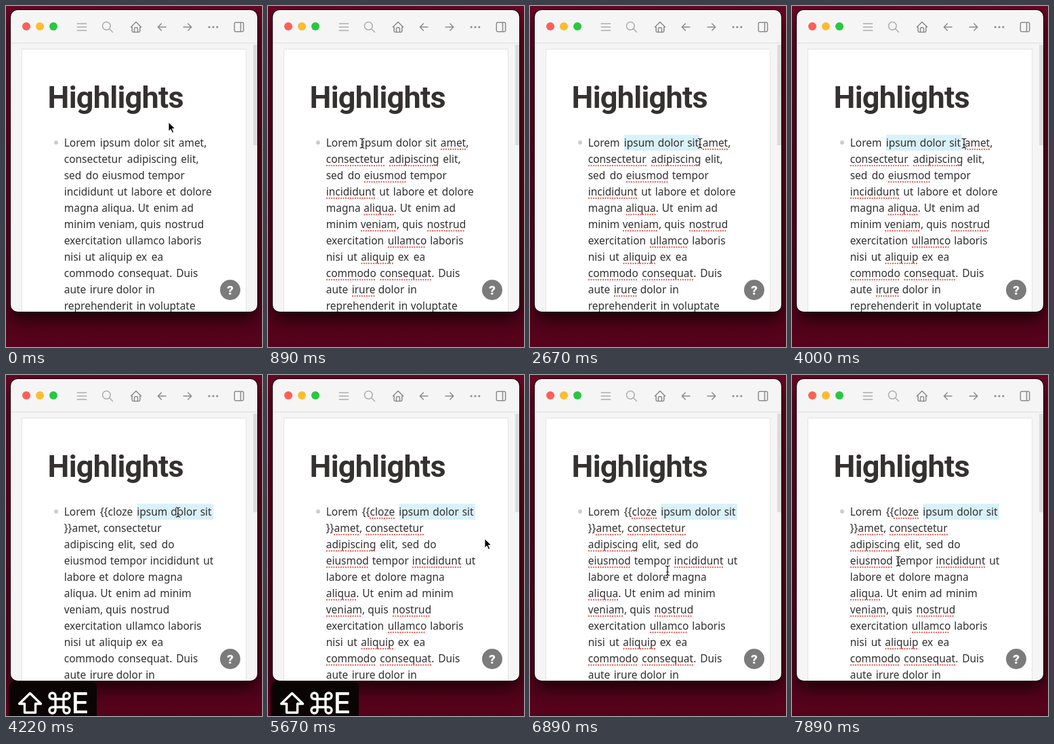
These frames come from a looping animation (378x502 px, 8000 ms). An HTML page:

```html
<!DOCTYPE html>
<html lang="en">
<head>
<meta charset="utf-8">
<title>Highlights</title>
<style>
  html, body { margin: 0; width: 100%; height: 100%; overflow: hidden; background: #55031c; }
  svg { display: block; width: 100%; height: 100%; }
  .body { font: 15.5px "Noto Sans", "Open Sans", sans-serif; fill: #303030; }
  .title { font: 700 45px Roboto, sans-serif; letter-spacing: -.75px; fill: #353131; }
  .squiggle { stroke: #e8625c; stroke-width: 2.3; stroke-linecap: round; stroke-dasharray: 0 3.5; }
  .icon { fill: none; stroke: #8c8c8c; stroke-width: 1.85; stroke-linecap: round; stroke-linejoin: round; }
  .pale { stroke: #adadad; }
  .key { fill: none; stroke: #fff; stroke-width: 3.4; stroke-linejoin: round; }
</style>
</head>
<body>
<svg viewBox="0 0 378 502">
  <defs>
    <linearGradient id="wall" x2="0" y2="1">
      <stop offset="0" stop-color="#6a0624"/>
      <stop offset=".5" stop-color="#62041f"/>
      <stop offset="1" stop-color="#55031b"/>
    </linearGradient>
    <filter id="blur" x="-20%" y="-20%" width="140%" height="140%"><feGaussianBlur stdDeviation="13"/></filter>
    <clipPath id="frame"><rect x="7" y="6" width="364" height="444" rx="10"/></clipPath>
  </defs>

  <rect width="378" height="502" fill="url(#wall)"/>
  <rect x="7" y="18" width="364" height="444" rx="10" opacity=".7" filter="url(#blur)"/>
  <rect x="6" y="5" width="366" height="446" rx="11" fill="#16000a"/>

  <g clip-path="url(#frame)">
    <rect x="7" y="6" width="364" height="444" fill="#f5f5f5"/>
    <rect x="7" y="54" width="364" height="1" fill="#dedede"/>
    <rect x="23.5" y="63.5" width="331" height="400" fill="#fff" stroke="#e4e4e4"/>
    <rect id="thumb" x="365" y="57" width="6" fill="#dcdcdc"/>

    <circle cx="30" cy="30" r="6" fill="#fe5f57"/>
    <circle cx="50" cy="30" r="6" fill="#febc2e"/>
    <circle cx="70" cy="30" r="6" fill="#28c840"/>
    <g id="toolbar"></g>

    <text class="title" x="61.6" y="149.5">Highlights</text>
    <circle cx="74" cy="201" r="3" fill="#cdcdcd"/>
    <rect id="mark" y="189.5" height="23.5" fill="#d9f1f9"/>
    <g id="before"></g>
    <g id="after"></g>

    <circle cx="331" cy="418" r="15" fill="#7b7b7b"/>
    <text x="331" y="424.5" text-anchor="middle" fill="#fff" style="font:900 19px Roboto,sans-serif">?</text>
  </g>

  <g id="keys">
    <rect x="4" y="450" width="130" height="64" rx="11" fill="#0b0405"/>
    <path class="key" d="M35.5 468.5L51.5 484H43.5V497H27.5V484H19.5Z"/>
    <path class="key" d="M73 472.5a4.500 4.500 0 1 0-4.500 4.500h21a4.500 4.500 0 1 0-4.500-4.500v21a4.500 4.500 0 1 0 4.500-4.500h-21a4.500 4.500 0 1 0 4.500 4.500z"/>
    <text x="96.5" y="498" fill="#fff" style="font:500 43px Inter,sans-serif">E</text>
  </g>

  <path id="arrow" d="M0 0V13.5L3.2 10.6L5.4 15.7L7.7 14.7L5.5 9.7H9.8Z" fill="#000" stroke="#fff"/>
  <g id="beam" fill="none" stroke-linecap="round">
    <path d="M-3-7Q0-7 0-5Q0-7 3-7M0-5V5M-3 7Q0 7 0 5Q0 7 3 7M-1.500 2H1.500" stroke="#fff" stroke-width="2.6"/>
    <path d="M-3-7Q0-7 0-5Q0-7 3-7M0-5V5M-3 7Q0 7 0 5Q0 7 3 7M-1.500 2H1.500" stroke="#111" stroke-width="1.2"/>
  </g>
</svg>

<script>
const $ = id => document.getElementById(id);
const LOOP = 8000, FPS = 9;
const LEFT = 86, RIGHT = 307, TOP = 207, LEADING = 24, ROWS = 11, SPACE = 6;

// Toolbar icons on a 24 unit grid, shown at 20 pixels around a centre x
const icon = (x, d, tone = "") =>
  `<path class="icon ${tone}" transform="translate(${x - 10} 21) scale(${20 / 24})" d="${d}"/>`;
$("toolbar").innerHTML =
  icon(112, "M4 6h16M4 12h16M4 18h16", "pale") +
  icon(150, "M17 10a7 7 0 1 0-14 0a7 7 0 1 0 14 0M21 21l-6-6", "pale") +
  icon(192, "M5 12H3l9-9l9 9h-2M5 12v7a2 2 0 0 0 2 2h10a2 2 0 0 0 2-2v-7M9 21v-6a2 2 0 0 1 2-2h2a2 2 0 0 1 2 2v6") +
  icon(230.2, "M5 12h14M5 12l6 6M5 12l6-6") +
  icon(268, "M5 12h14M13 18l6-6M13 6l6 6") +
  icon(306, [5, 12, 19].map(x => `M${x - 1} 12a1 1 0 1 0 2 0a1 1 0 1 0-2 0`).join("")) +
  icon(344, "M6 4h12a2 2 0 0 1 2 2v12a2 2 0 0 1-2 2H6a2 2 0 0 1-2-2V6a2 2 0 0 1 2-2zM15 4v16");

// word:advance, with * on words the spell checker flags
const tail = `consectetur:93* adipiscing:79.5* elit,:32.5 sed:32 do:24 eiusmod:68* tempor:59
  incididunt:78.5* ut:20.5 labore:51.5 et:20.5 dolore:52 magna:55.5 aliqua.:53.5* Ut:23 enim:41
  ad:24 minim:51 veniam,:61.5* quis:36.5 nostrud:62* exercitation:91 ullamco:62.5* laboris:55
  nisi:31 ut:20.5 aliquip:54.5* ex:23 ea:22 commodo:79.5* consequat.:86* Duis:38 aute:38
  irure:39* dolor:43.5 in:18 reprehenderit:107 in:18 voluptate:74`;
const plain = "Lorem:53 ipsum:50 dolor:43.5 sit:22.5 amet,:47* " + tail;
const cloze = "Lorem:53 {{cloze:54.5* ipsum:50 dolor:43.5 sit:22.5 }}amet,:58* " + tail;

// Wraps the words and returns markup for the text and the spelling dots.
function paragraph(source) {
  let x = LEFT, row = 0, words = "", dots = "";
  for (const item of source.split(/\s+/)) {
    const [word, size] = item.split(":");
    const advance = parseFloat(size);
    if (x + advance - SPACE > RIGHT) { x = LEFT; row++; }
    if (row >= ROWS) break;
    const y = TOP + row * LEADING;
    words += `<text x="${x - 0.3}" y="${y}">${word}</text>`;
    if (size.endsWith("*")) {
      const start = x + 5.5 * word.match(/^[{}]*/)[0].length + 1;
      const end = x + advance - SPACE - (/[.,]$/.test(word) ? 4 : 0);
      dots += `M${start} ${y + 4}H${end}`;
    }
    x += advance;
  }
  return `<g class="body">${words}</g><path class="squiggle" d="${dots}"/>`;
}

const before = $("before"), after = $("after");
before.innerHTML = paragraph(plain);
after.innerHTML = paragraph(cloze);

// Pointer stops: time, x, y
const path = [
  [0, 240, 171], [110, 240, 171], [780, 139, 202], [1000, 139, 202],
  [1667, 199, 202], [2450, 251, 202], [2670, 251, 202], [3220, 254, 202],
  [5221, 254, 202], [5222, 320, 241], [5667, 320, 241], [6111, 215, 288],
  [6333, 203, 288], [6889, 203, 288], [7667, 157, 274], [LOOP, 157, 274]
];
const carets = [139, 143, 153, 161, 171, 185, 189, 198.5, 207, 211, 220.5, 226, 232, 240, 244, 250];

function pointer(t) {
  const i = Math.max(1, path.findIndex(p => p[0] >= t));
  const [t0, x0, y0] = path[i - 1], [t1, x1, y1] = path[i];
  const u = Math.max(0, Math.min(1, (t - t0) / (t1 - t0)));
  const k = u * u * (3 - 2 * u);
  return [x0 + (x1 - x0) * k, y0 + (y1 - y0) * k];
}

const show = (el, on) => el.setAttribute("display", on ? "inline" : "none");

function draw(now) {
  const step = Math.floor((now % LOOP) * FPS / 1000 + 0.05) % (LOOP * FPS / 1000);
  const t = step * 1000 / FPS;
  const wrapped = t > 4200;

  show(before, !wrapped);
  show(after, wrapped);
  show(before.lastChild, t > 650);
  show(after.lastChild, t > 4880);
  show($("keys"), wrapped && t < 6330);
  $("thumb").setAttribute("height", wrapped ? 145 : 148);

  // The selection trails the pointer by one step.
  let from = 139, to = 139;
  if (wrapped) { from = 193.5; to = 306; }
  else if (t > 1000) {
    const [x] = pointer(t - 1000 / FPS);
    to = carets.filter(c => c <= x).pop() || from;
  }
  $("mark").setAttribute("x", from);
  $("mark").setAttribute("width", to - from);

  const [x, y] = pointer(t);
  const overText = x < RIGHT && y > 190;
  show($("beam"), overText);
  show($("arrow"), !overText);
  $(overText ? "beam" : "arrow").setAttribute("transform", `translate(${x} ${y})`);
}

const began = performance.now();
function tick() {
  draw(performance.now() - began);
  requestAnimationFrame(tick);
}
tick();
</script>
</body>
</html>
```
